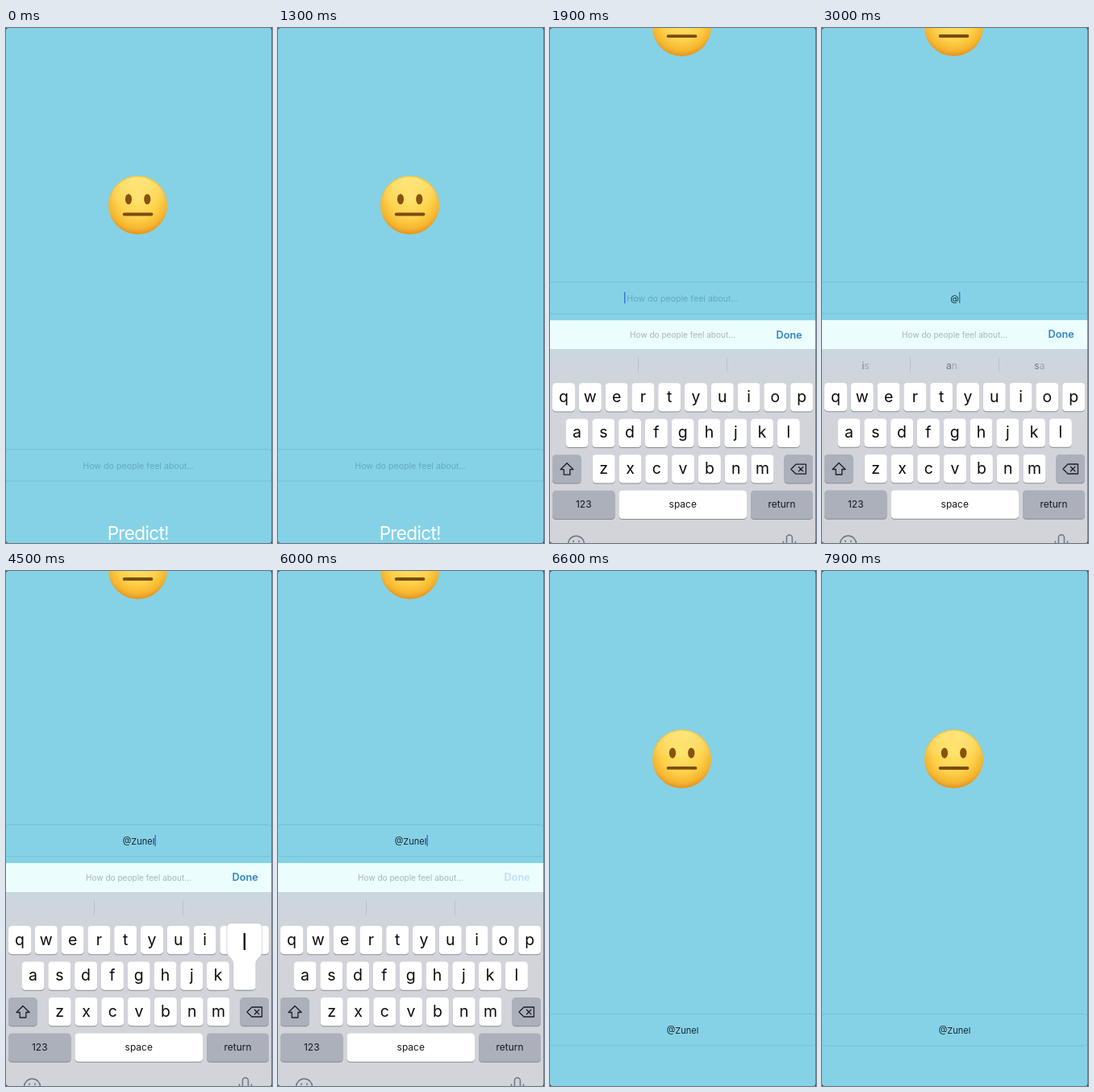
An HTML page that plays this animation: 330 px wide and 640 px high, repeating every 8 s.

```html
<!DOCTYPE html>
<html lang="en">
<head>
<meta charset="utf-8">
<title>Mood predictor</title>
<style>
  html, body { margin: 0; width: 100%; height: 100%; overflow: hidden; background: #85d2e6; }
  svg { display: block; width: 330px; height: 640px; font-family: Inter, Roboto, sans-serif; }
  text { white-space: pre; }
  .mid { text-anchor: middle; }
  .key { font-size: 19.5px; fill: #0c0c0e; }
  .label { font-size: 12px; fill: #16181b; }
  .icon { fill: none; stroke: #1c1e22; stroke-width: 1.3; stroke-linejoin: round; stroke-linecap: round; }
  .dim { fill: none; stroke: #70757d; stroke-width: 1.5; stroke-linecap: round; }
</style>
</head>
<body>
<svg viewBox="0 0 330 640">
  <defs>
    <radialGradient id="skin" cx=".5" cy=".4" r=".62">
      <stop offset="0" stop-color="#ffe26a"/>
      <stop offset=".55" stop-color="#fdd14a"/>
      <stop offset=".82" stop-color="#f6b52f"/>
      <stop offset="1" stop-color="#e08a1c"/>
    </radialGradient>
    <linearGradient id="shine" x2="0" y2="1">
      <stop offset="0" stop-color="#fff3a0" stop-opacity=".6"/>
      <stop offset=".5" stop-color="#fff3a0" stop-opacity="0"/>
    </linearGradient>
    <linearGradient id="tray" x2="0" y2="1">
      <stop offset="0" stop-color="#cbd6df"/>
      <stop offset=".2" stop-color="#d1d4da"/>
      <stop offset="1" stop-color="#d3d4da"/>
    </linearGradient>
  </defs>

  <rect width="330" height="640" fill="#85d2e6"/>

  <g id="face">
    <circle cx="163.5" cy="220" r="36.5" fill="url(#skin)"/>
    <circle cx="163.5" cy="220" r="35" fill="url(#shine)"/>
    <g fill="#87530f">
      <ellipse cx="152" cy="212.7" rx="4.1" ry="6.5"/>
      <ellipse cx="175.3" cy="212.7" rx="4.1" ry="6.5"/>
    </g>
    <path d="M146.7 231.5H180.5" stroke="#7c4b10" stroke-width="3.8" stroke-linecap="round"/>
  </g>

  <g id="form">
    <rect x="-1.5" y="523.5" width="332" height="39.5" rx="5" fill="none" stroke="#76bfd2"/>
    <text id="hint" class="mid" x="164.5" y="547.6" font-size="10.65" fill="#68a8ba">How do people feel about...</text>
    <text id="entry" class="mid" x="164.5" y="547.6" font-size="11" fill="#14262d"></text>
    <rect id="caret" y="536" width="1.4" height="14" fill="#3a70c8"/>
    <text class="mid" x="163.8" y="635.5" font-size="22.5" letter-spacing="-.65" fill="#fff">Predict!</text>
  </g>

  <g id="board">
    <rect y="363" width="330" height="36" fill="#ecfdfe"/>
    <text class="mid" x="164.5" y="384.5" font-size="10.05" fill="#a8b6ba">How do people feel about...</text>
    <text id="done" class="mid" x="296.7" y="385.4" font-size="12.8" font-weight="600" fill="#2d87bf">Done</text>
    <rect y="399" width="330" height="250" fill="url(#tray)"/>
    <path d="M109.5 409V428M219.5 409V428" stroke="#bcc1c8"/>
    <g id="words"></g>
    <g id="letters"></g>
    <g id="symbols"></g>
    <g id="bottom"></g>
    <g class="dim">
      <circle cx="32.5" cy="641" r="10"/>
      <path d="M29 637v1.5M36 637v1.5"/>
      <rect x="293.5" y="629.8" width="7" height="15" rx="3.5"/>
      <path d="M289.5 638v4M304.5 638v4"/>
    </g>
    <g id="popup"></g>
  </g>

  <rect x="329.3" width=".7" height="640" fill="#3f6f7c"/>
  <path d="M0 0H3Q0 0 0 3ZM330 0H327Q330 0 330 3ZM0 640V637Q0 640 3 640ZM330 640V637Q330 640 327 640Z" fill="#1d2a30"/>
</svg>

<script>
const LOOP = 8000;
const FOCUS = 1367, DISMISS = 6020;     // keyboard starts up, starts down
const LIFT = 235, DROP = 285;           // travel of the view and of the keyboard
const ROWS = [441, 485.5, 530, 574.5];
const STEP = 32.8;

const $ = id => document.getElementById(id);
const clamp = v => Math.max(0, Math.min(1, v));
const show = (el, on) => el.setAttribute('visibility', on ? 'inherit' : 'hidden');
const move = (el, y) => el.setAttribute('transform', `translate(0 ${y.toFixed(2)})`);

function add(parent, tag, attrs, text) {
  const el = document.createElementNS('http://www.w3.org/2000/svg', tag);
  for (const k in attrs) el.setAttribute(k, attrs[k]);
  if (text) el.textContent = text;
  parent.appendChild(el);
  return el;
}

const places = {};

function cap(parent, x, y, w, fill) {
  add(parent, 'rect', { x, y: y + 1, width: w, height: 35.3, rx: 4.3, fill: '#898c92' });
  return add(parent, 'rect', { x, y, width: w, height: 35.3, rx: 4.3, fill });
}

function key(parent, char, cx, y, w = 28) {
  cap(parent, cx - w / 2, y, w, '#fff');
  places[char] = { cx, y };
  return add(parent, 'text', { class: 'mid key', x: cx, y: y + 23.5 }, char);
}

function wide(parent, x, y, w, fill, text) {
  cap(parent, x, y, w, fill);
  return add(parent, 'text', { class: 'mid label', x: x + w / 2, y: y + 21.7 }, text);
}

function row(parent, chars, first, y, step = STEP, w = 28) {
  return [...chars].map((c, i) => key(parent, c, first + i * step, y, w));
}

function backspace(parent) {
  cap(parent, 290.5, ROWS[2], 35.5, '#abb0ba');
  add(parent, 'path', { class: 'icon', d: 'M299 548l6-6h12.5v12H305zM308.5 545.3l5.4 5.4m0-5.4l-5.4 5.4' });
}

const GREY = '#abb0ba';
const letters = $('letters'), symbols = $('symbols'), bottom = $('bottom');

const alpha = [
  ...row(letters, 'qwertyuiop', 17, ROWS[0]),
  ...row(letters, 'asdfghjkl', 33.5, ROWS[1]),
  ...row(letters, 'zxcvbnm', 66.7, ROWS[2])
];
const shiftCap = cap(letters, 3, ROWS[2], 35.5, GREY);
const shiftIcon = add(letters, 'path', { class: 'icon', d: 'M21 540.5l8 8h-4.2v6.5h-7.6v-6.5H13z' });
backspace(letters);

row(symbols, '1234567890', 17, ROWS[0]);
row(symbols, '-/:;()$&@"', 17, ROWS[1]);
row(symbols, ".,?!'", 73.5, ROWS[2], 45.8, 41);
wide(symbols, 3, ROWS[2], 35.5, GREY, '#+=');
backspace(symbols);

const modeLabel = wide(bottom, 3, ROWS[3], 77.5, GREY, '123');
wide(bottom, 85.5, ROWS[3], 158.5, '#fff', 'space');
wide(bottom, 249, ROWS[3], 77, GREY, 'return');

// Suggestions fade in letter by letter
const spans = [];
['is', 'and', 'said'].forEach((word, n) => {
  const t = add($('words'), 'text', { class: 'mid', x: 54 + n * 110.5, y: 423.5, 'font-size': 12, fill: '#4c5056' });
  [...word].forEach((c, i) => spans.push({ el: add(t, 'tspan', {}, c), i }));
});

const popup = $('popup');
const bubble = add(popup, 'path', { fill: '#fff', stroke: '#b4b8be', 'stroke-width': .6 });
const bubbleText = add(popup, 'text', { class: 'mid', 'font-size': 28, fill: '#0c0c0e' });

function drawPopup(char) {
  const { cx, y } = places[char.toLowerCase()];
  const mid = Math.max(24, Math.min(305, cx));
  const l = mid - 22, r = mid + 22;
  bubble.setAttribute('d', `M${l + 6} ${y - 48}H${r - 6}Q${r} ${y - 48} ${r} ${y - 42}V${y - 14}` +
    `C${r} ${y - 4} ${cx + 14} ${y - 6} ${cx + 14} ${y + 4}V${y + 31}q0 4 -4 4H${cx - 10}q-4 0 -4 -4V${y + 4}` +
    `C${cx - 14} ${y - 6} ${l} ${y - 4} ${l} ${y - 14}V${y - 42}Q${l} ${y - 48} ${l + 6} ${y - 48}Z`);
  bubbleText.setAttribute('x', mid);
  bubbleText.setAttribute('y', y - 15);
  bubbleText.textContent = char;
}

const strokes = [['@', 2450], ['Z', 3900], ['u', 4050], ['n', 4200], ['e', 4350], ['l', 4500]];

function spring(ms) {
  if (ms <= 0) return 0;
  const x = ms * 0.01826;
  return 1 - (1 + x) * Math.exp(-x);
}

const face = $('face'), form = $('form'), board = $('board');
const hint = $('hint'), entry = $('entry'), caret = $('caret'), done = $('done');

function draw(t) {
  const up = spring(t - FOCUS) - spring(t - DISMISS);
  const relaid = t >= FOCUS ? 1 : 0;
  move(face, 13.5 * relaid - LIFT * up);
  move(form, 27 * relaid - LIFT * up);
  move(board, DROP * (1 - up));

  const typed = strokes.filter(s => t >= s[1]);
  entry.textContent = typed.map(s => s[0]).join('');
  show(hint, !typed.length);

  const last = typed.length ? typed[typed.length - 1][1] : FOCUS;
  const focused = t >= FOCUS && t < DISMISS;
  show(caret, focused && (t - last) % 1000 < 600);
  caret.setAttribute('x', typed.length ? 164.7 + entry.getComputedTextLength() / 2 : 92);

  const symbolic = t >= 2050 && t < 2650;
  show(letters, !symbolic);
  show(symbols, symbolic);
  modeLabel.textContent = symbolic ? 'ABC' : '123';

  const upper = t >= 3700 && t < 3900;
  alpha.forEach(k => {
    k.textContent = upper ? k.textContent.toUpperCase() : k.textContent.toLowerCase();
  });
  shiftCap.setAttribute('fill', upper ? '#fff' : GREY);
  shiftIcon.style.fill = upper ? '#1c1e22' : 'none';

  const pressed = strokes.find(s => t >= s[1] - 70 && t < s[1] + 50);
  show(popup, pressed);
  if (pressed) drawPopup(pressed[0]);

  spans.forEach(({ el, i }) => {
    el.setAttribute('fill-opacity', t < 3700 ? clamp((t - 2930 - i * 35) / 100) : 0);
  });
  done.setAttribute('opacity', t >= 5930 ? 0.24 + 0.76 * clamp((t - 6050) / 250) : 1);
}

const start = performance.now();
function tick() {
  draw((performance.now() - start) % LOOP);
  requestAnimationFrame(tick);
}
tick();
</script>
</body>
</html>
```
